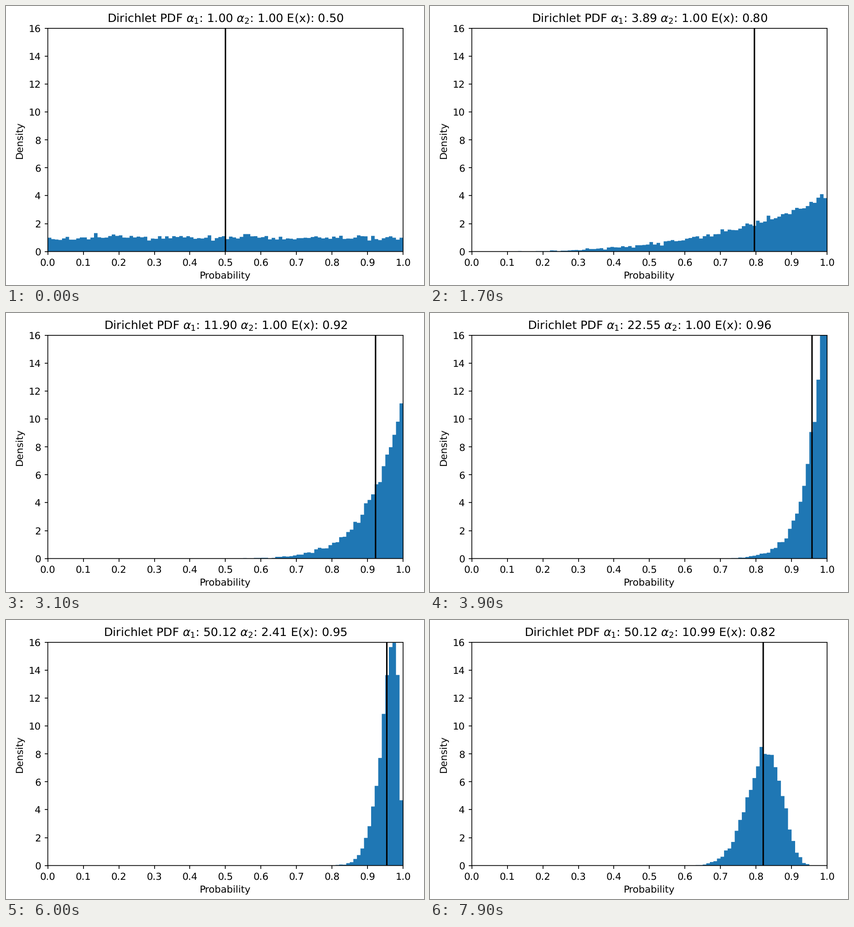
A matplotlib script that plays this animation: 917x611 px, repeating every 8000 ms.

```python
import numpy as np
import matplotlib.pyplot as plt
from matplotlib.animation import FuncAnimation

FRAMES, INTERVAL = 80, 100
SAMPLES, BINS = 10_000, 100

# Keep lines and glyphs at their true sub-pixel places.
plt.rcParams.update({"font.family": "DejaVu Sans",
                     "path.snap": False,
                     "text.hinting": "none"})

# First alpha 1 grows on a log scale, then alpha 2 follows the same steps.
steps = np.logspace(0, 1.7, 50)
last = len(steps) - 1
edges = np.linspace(0, 1, BINS + 1)

fig = plt.figure(figsize=(6.0033, 4), dpi=152.75, facecolor="white")
ax = fig.add_axes([0.1, 0.12, 0.85, 0.8])
ax.set(xlim=(0, 1), ylim=(0, 16), xlabel="Probability", ylabel="Density")
ax.set_xticks(np.arange(11) / 10)
ax.set_yticks(range(0, 17, 2))

hist = ax.stairs(np.zeros(BINS), edges, fill=True, color="tab:blue")
mean_line = ax.axvline(0.5, color="black", lw=1.5)
title = ax.set_title("")
ax.set(xlim=(0, 1), ylim=(0, 16))


def alphas(i):
    return steps[min(i, last)], steps[max(i - last, 0)]


def update(i):
    a1, a2 = alphas(i)
    mean = a1 / (a1 + a2)
    rng = np.random.default_rng(i)
    draws = rng.dirichlet((a1, a2), SAMPLES)[:, 0]
    density, _ = np.histogram(draws, bins=edges, density=True)
    hist.set_data(values=density)
    mean_line.set_xdata([mean, mean])
    title.set_text(rf"Dirichlet PDF $\alpha_1$: {a1:.2f} "
                   rf"$\alpha_2$: {a2:.2f} E(x): {mean:.2f}")
    return hist, mean_line, title


anim = FuncAnimation(fig, update, frames=FRAMES, interval=INTERVAL,
                     repeat=True, repeat_delay=0, blit=False)
plt.show()
```
